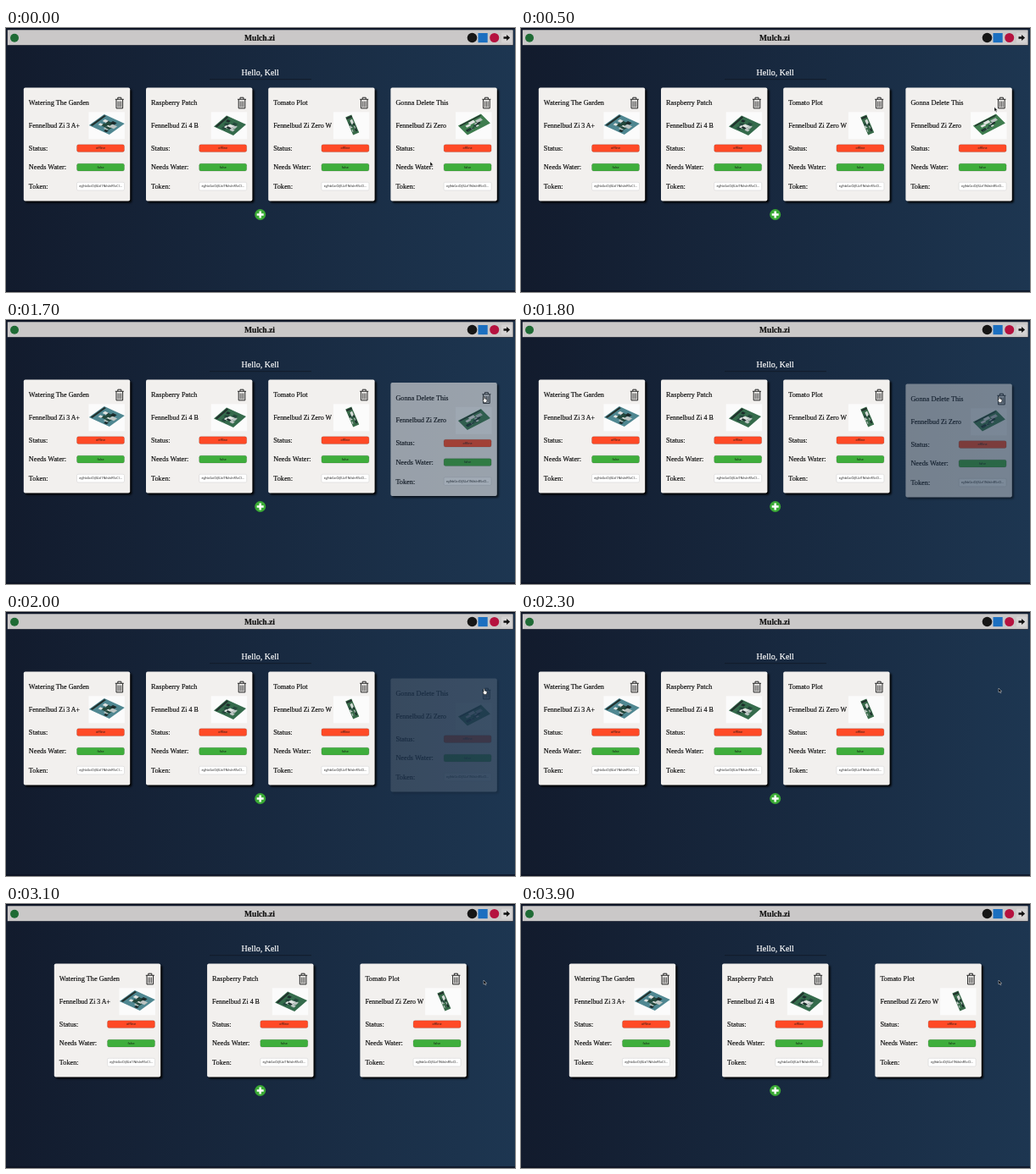
An HTML page that plays this animation: 600 by 312 pixels, repeating every 4000 ms.

```html
<!DOCTYPE html>
<html lang="en">
<head>
<meta charset="utf-8">
<title>Mulch.zi</title>
<style>
  html, body { margin: 0; width: 100%; height: 100%; overflow: hidden; background: #121a2d; }
  svg { display: block; width: 600px; height: 312px; }
  text { font: 8.25px "Liberation Serif", serif; fill: #111; stroke: #111; stroke-width: .18px; }
  .model { font-size: 7.95px; }
  .small { font: 3.7px "Open Sans", sans-serif; text-anchor: middle; stroke: none; }
  .brand { font-size: 9.6px; font-weight: bold; text-anchor: middle; }
  .hello { font-size: 10px; text-anchor: middle; fill: #fff; stroke: #fff; }
  .panel { fill: #f2f0ee; filter: drop-shadow(2px 2px 1px #000); }
  .pill { stroke: #0004; stroke-width: .5; }
</style>
</head>
<body>
<svg viewBox="0 0 600 312">
  <defs>
    <linearGradient id="sky">
      <stop offset="0" stop-color="#121b2d"/>
      <stop offset="1" stop-color="#1d3651"/>
    </linearGradient>
    <g id="trash" fill="none" stroke="#222">
      <path d="M108 13.8h10M111 13.5v-1.8h4v1.8M109.2 14v10.4h7.6v-10.4"/>
      <path d="M111.2 16v7M113 16v7M114.8 16v7" stroke-width=".8"/>
    </g>
  </defs>
  <rect width="600" height="312" fill="url(#sky)"/>
  <path d="M0 .7h600M0 311h600" stroke="#0c1222" stroke-width="1.4"/>

  <rect x="1.5" y="2" width="596.5" height="18.5" rx="1" fill="#cac8c8" stroke="#0c1222" stroke-width=".6"/>
  <circle cx="10" cy="11.8" r="5" fill="#1f6b35"/>
  <text class="brand" x="299" y="15">Mulch.zi</text>
  <circle cx="549.5" cy="11.5" r="5.8" fill="#161616"/>
  <rect x="556.5" y="6" width="11.2" height="11.2" fill="#1b6fc0"/>
  <circle cx="575.7" cy="11.5" r="5.5" fill="#b5123f"/>
  <rect x="584" y="5.5" width="12" height="12" rx="1" fill="#d5d3d3"/>
  <path d="M586.5 10.2h3.6v-2.2l4 3.5l-4 3.5v-2.2h-3.6z" fill="#111"/>

  <text class="hello" x="299.7" y="55.5">Hello, Kell</text>
  <path d="M240 60.7h120" stroke="#111a28" stroke-width=".9"/>

  <g id="cards"></g>

  <circle cx="299.7" cy="220.5" r="6.5" fill="#3aaa35"/>
  <path d="M299.7 216.5v8M295.7 220.5h8" stroke="#fff" stroke-width="2.5"/>

  <path id="arrow" d="M0 0v5l1.2-1l.9 1.9l.9-.4l-.9-1.8h1.6z" stroke="#fff" stroke-width=".4"/>
  <path id="hand" d="M0 0q.8-.8 1.3 0v2l2.6.7v2.1l-.7 1.6h-2.6l-1.8-2.7l.6-.4l.6.5z" fill="#fff" stroke="#000" stroke-width=".5"/>
</svg>
<script>
const $ = id => document.getElementById(id);
const CARD_TOP = 70.5, CARD_WIDTH = 125.4;

let seed = 7;
const random = () => (seed = seed * 16807 % 2147483647) / 2147483647;

// A unit square with scattered chips, slanted into place by its matrix.
function board(matrix, fill) {
  const colors = ['#1b2a2a', '#bcc4c2', '#24483c', '#dfe3e0'];
  let parts = `<rect width="1" height="1" fill="${fill}"/>
    <rect x=".05" y=".04" width=".9" height=".09" fill="#22302c"/>`;
  for (let i = 0; i < 12; i++) {
    const x = .06 + .64 * random(), y = .16 + .56 * random(), size = .1 + .14 * random();
    parts += `<rect x="${x}" y="${y}" width="${size}" height="${size}" fill="${colors[i % 4]}"/>`;
  }
  return `<g transform="matrix(${matrix})">${parts}</g>`;
}

const pill = (y, fill, label) =>
  `<rect class="pill" x="62.7" y="${y}" width="56" height="8.8" rx="2" fill="${fill}"/>
   <text class="small" x="90.7" y="${y + 5.7}">${label}</text>`;

const card = ({ title, model, matrix, color }) => `<g>
  <rect class="panel" width="${CARD_WIDTH}" height="134" rx="2"/>
  <text x="6" y="20.8">${title}</text>
  <use href="#trash"/>
  <rect x="76.7" y="28.8" width="42.4" height="32" fill="#fbfbfb"/>
  ${board(matrix, color)}
  <text class="model" x="6" y="47.3">Fennelbud Zi ${model}</text>
  ${['Status', 'Needs Water', 'Token'].map((s, i) => `<text x="6" y="${74.3 + 22.65 * i}">${s}:</text>`).join('')}
  ${pill(67.2, '#ff4a26', 'offline')}
  ${pill(89.7, '#3fae3c', 'false')}
  <rect x="62.7" y="111.8" width="56" height="9.6" rx="1.5" fill="#fff" stroke="#ccc" stroke-width=".5"/>
  <text class="small" x="90.7" y="117.9">eyJhbGciOiJIUzI1NiIsInR5cCI...</text>
</g>`;

$('cards').innerHTML = [
  { title: 'Watering The Garden', model: '3 A+', matrix: '18 -13 24 11 77 44.5', color: '#4f8791' },
  { title: 'Raspberry Patch', model: '4 B', matrix: '15 -13 23 10.5 80 46', color: '#356b4c' },
  { title: 'Tomato Plot', model: 'Zero W', matrix: '7 -3 9 21 91 35', color: '#386a49' },
  { title: 'Gonna Delete This', model: 'Zero', matrix: '27 -14 11 11 79.5 45', color: '#3f7d4f' }
].map(card).join('');
const cards = [...$('cards').children];

const ramp = (t, start, length) => Math.min(1, Math.max(0, (t - start) / length));
const ease = v => v * v * (3 - 2 * v);
const place = (el, x, y) => el.setAttribute('transform', `translate(${x} ${y})`);
const fade = (el, opacity) => el.setAttribute('opacity', opacity);

function draw(t) {
  // The deleted card sinks and fades, then the rest spread out.
  const count = t < 2500 ? 4 : 3;
  const gap = count === 4 ? 144.2 : 180.3;
  const gone = ramp(t, 1467, 667);
  cards.forEach((el, i) => {
    const x = 299.8 + (i - (count - 1) / 2) * gap - CARD_WIDTH / 2;
    place(el, x, CARD_TOP + (i === 3 ? 10 * gone : 0));
  });
  fade(cards[3], (1 - gone) ** 1.25);

  const reach = ease(ramp(t, 0, 500)), settle = ease(ramp(t, 600, 400));
  const x = 500 + 58 * reach + 5 * settle;
  const y = 158 - 64.5 * reach - 3.5 * settle;
  const overTrash = t >= 800 && t < 2100;
  place($('arrow'), x, y);
  place($('hand'), x, y + 1);
  fade($('arrow'), overTrash ? 0 : 1);
  fade($('hand'), overTrash ? 1 : 0);
}

function tick() {
  draw(Math.floor(performance.now() % 4000 / 100) * 100);
  requestAnimationFrame(tick);
}
tick();
</script>
</body>
</html>
```
